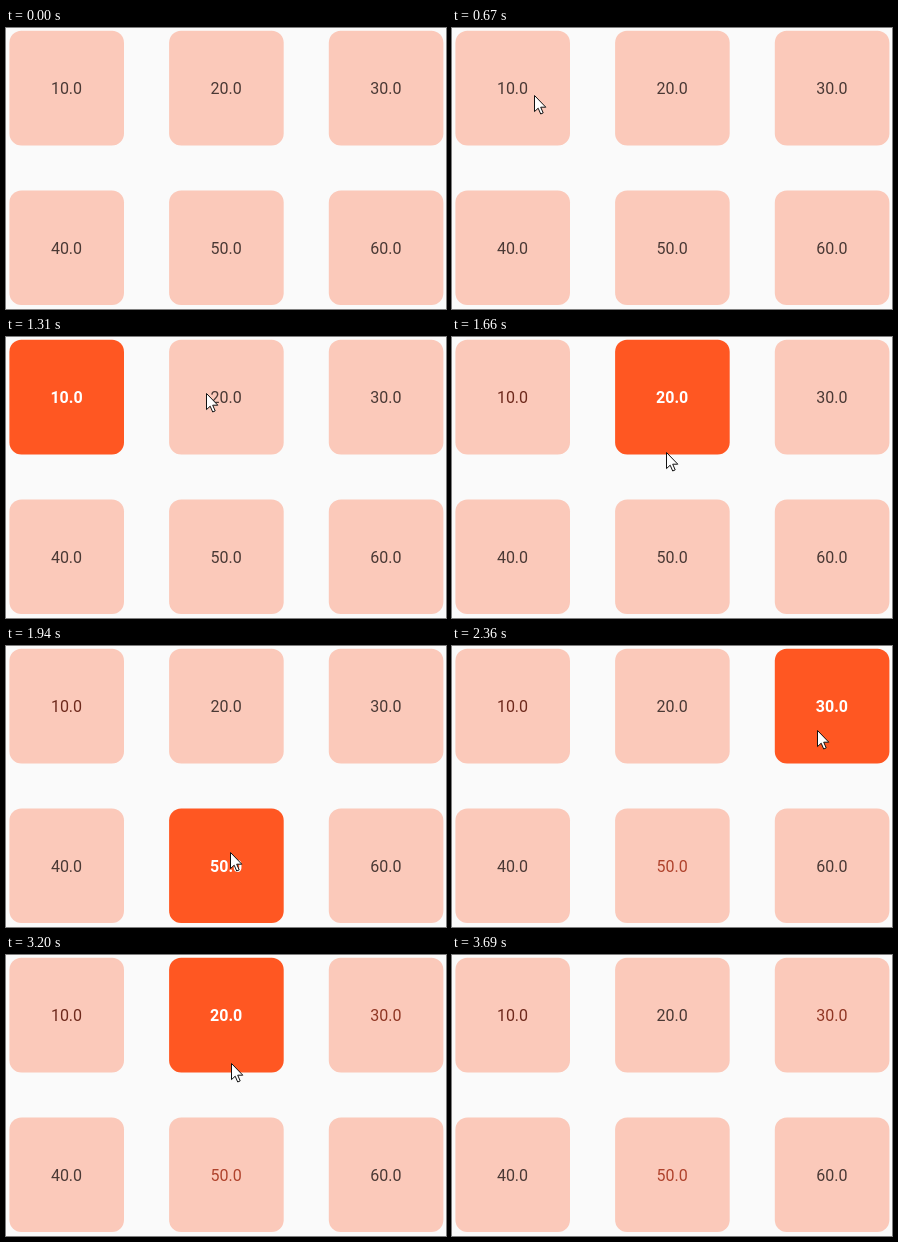
These frames come from a looping animation (440x281 px, 4.35 s). An HTML page:

```html
<!DOCTYPE html>
<html lang="en">
<head>
<meta charset="utf-8">
<title>Selectable tiles</title>
<style>
html, body { margin: 0; width: 100%; height: 100%; overflow: hidden; background: #fafafa; }
svg { display: block; width: 440px; height: 281px; }
text { font: 16px Roboto, sans-serif; text-anchor: middle; }
rect { fill: #fbc9ba; }
.on rect { fill: #ff5722; }
.on text { fill: #fff; font-weight: 700; }
</style>
</head>
<body>
<svg viewBox="0 0 440 281">
  <g id="tiles"></g>
  <path id="cursor" d="M.5.5V16.6L4.2 13.2 6.7 19 9.2 17.9 6.7 12.2H11.8Z" fill="#fff" stroke="#111" stroke-linejoin="round"/>
</svg>
<script>
const LOOP = 4350, STEP = 70, GLIDE = 7 * STEP, SHOW = 330, HIDE = 3690;
const DARK = '#4a3935';
// Pointer stops: arrival time, position, tile selected from then on
const stops = [
  { at: SHOW, x: 95, y: 119 },
  { at: 820, x: 79, y: 54 },
  { at: 890, x: 79, y: 54, tile: 0 },
  { at: 1380, x: 207, y: 56, tile: 1 },
  { at: 1940, x: 224, y: 206, tile: 4 },
  { at: 2360, x: 365, y: 84, tile: 2 },
  { at: 2980, x: 225, y: 108, tile: 1 },
  { at: 3270, x: 225, y: 108 },
  { at: HIDE, x: 225, y: 223 }
];

const tiles = document.getElementById('tiles');
const cursor = document.getElementById('cursor');
for (let i = 0; i < 6; i++) {
  const x = 3.4 + i % 3 * 159.7, y = 2.8 + Math.floor(i / 3) * 159.7;
  tiles.innerHTML += `<g transform="translate(${x} ${y})"><rect width="114.6" height="114.6" rx="12"/>` +
    `<text x="57.1" y="63.7">${i + 1}0.0</text></g>`;
}

const smooth = k => k * k * (3 - 2 * k);

// Rest at each stop, then glide so as to arrive at the next one on time
function pointAt(t) {
  const n = stops.findIndex(s => s.at > t);
  const from = stops[n - 1], to = stops[n];
  const span = Math.min(GLIDE, to.at - from.at);
  const k = smooth(Math.max(0, 1 - (to.at - t) / span));
  return [from.x + (to.x - from.x) * k, from.y + (to.y - from.y) * k].map(Math.round);
}

// Some tiles keep a warm text tint after use
const usedColor = i => i % 2 ? DARK : `hsl(10 60% ${27 + 4 * i}%)`;

function draw(time) {
  const t = SHOW + Math.floor((time - SHOW + 10) / STEP) * STEP;
  const past = stops.filter(s => s.at <= t).map(s => s.tile);
  const selected = past[past.length - 1];

  [...tiles.children].forEach((tile, i) => {
    tile.setAttribute('class', i === selected ? 'on' : '');
    tile.lastChild.setAttribute('fill', past.includes(i) ? usedColor(i) : DARK);
  });

  const visible = t >= SHOW && t < HIDE;
  cursor.setAttribute('visibility', visible ? 'visible' : 'hidden');
  if (visible) cursor.setAttribute('transform', `translate(${pointAt(t)})`);
}

const start = performance.now();
function frame() {
  draw((performance.now() - start) % LOOP);
  requestAnimationFrame(frame);
}
frame();
</script>
</body>
</html>
```
